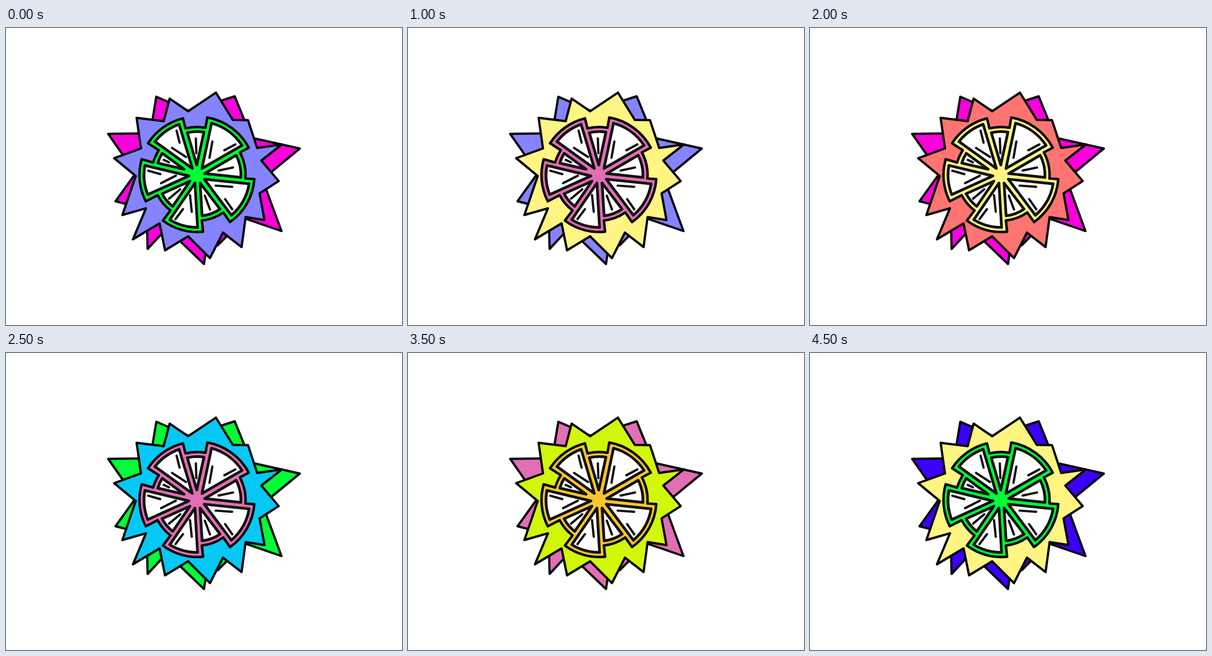
Write an HTML page with a canvas that moves like this. It is 864x648 px and loops after 5000 ms.

```html
<!DOCTYPE html>
<html lang="en">
<head>
<meta charset="utf-8">
<title>Citrus burst</title>
<style>
html, body { margin: 0; width: 100%; height: 100%; overflow: hidden; background: #fff; }
canvas { display: block; }
</style>
</head>
<body>
<canvas id="stage" width="864" height="648"></canvas>
<script>
const ctx = document.getElementById('stage').getContext('2d');
const STEP = 500;
const RAD = Math.PI / 180;
const FRUIT = [417, 321];
const HUB = [421.5, 318], HUB_R = 138.5;

const green = '#00ff37', peri = '#8584ff', magenta = '#fc00dc', cyan = '#05c8f5';
const lavender = '#c2ceff', coral = '#ff7470', pink = '#e26eb4', lime = '#d2f70a';
const orange = '#fac52d', yellow = '#fff582', indigo = '#3c00ff';

// fruit, inner burst, outer burst
const schemes = [
  [green, peri, magenta], [peri, lavender, cyan], [pink, yellow, peri],
  [lavender, coral, cyan], [yellow, coral, magenta], [pink, cyan, green],
  [coral, lavender, orange], [orange, lime, pink], [lavender, magenta, lime],
  [green, yellow, indigo]
];

// Spikes on a round hub: tip x, tip y, then the hub angle of the next notch.
const outerSpikes = [
  [328, 150, -99], [499, 149, -34.5], [641, 263, 5], [601, 443, 44.6], [462, 474, 82],
  [432, 515, 120.7], [309, 482, 146], [239, 378, 180.5], [223, 231, 219.6]
];
const innerSpikes = [
  [357, 154, -100], [458, 141, -58], [528, 201, -24], [602, 254, -12], [595, 334, 18],
  [564, 419, 43], [514, 478, 68], [445, 502, 100], [347, 485, 128.6], [277, 461, 147],
  [254, 408, 178], [236, 284, 203.5], [285, 196, 236]
];

// Cut angles around the fruit; wide and narrow slices alternate.
const cuts = [213, 256, 280, 332, 364, 415, 444, 487, 513, 556, 573];

function polar([cx, cy], deg, r) {
  return [cx + r * Math.cos(deg * RAD), cy + r * Math.sin(deg * RAD)];
}

function burst(spikes) {
  const path = new Path2D();
  for (const [x, y, notch] of spikes) {
    path.lineTo(x, y);
    path.lineTo(...polar(HUB, notch, HUB_R));
  }
  path.closePath();
  return path;
}

function addArc(path, r, from, to) {
  path.arc(...FRUIT, r, from * RAD, to * RAD);
}

function wedge(r, from, to, tip) {
  const path = new Path2D();
  addArc(path, r, from, to);
  path.lineTo(...polar(FRUIT, (from + to) / 2, tip));
  path.closePath();
  return path;
}

// A dash beside the ray at deg, shifted sideways by offset.
function dash(path, deg, from, to, offset) {
  const base = polar(FRUIT, deg + 90, offset);
  path.moveTo(...polar(base, deg, from));
  path.lineTo(...polar(base, deg, to));
}

const outerPath = burst(outerSpikes);
const innerPath = burst(innerSpikes);
const rimPath = new Path2D();
const dashPath = new Path2D();
const wedgePaths = [];

for (let i = 0; i < cuts.length - 1; i++) {
  const from = cuts[i], to = cuts[i + 1], mid = (from + to) / 2;
  if (i % 2 === 0) {
    const r = 126 - 2 * Math.sin(mid * RAD);
    addArc(rimPath, r, from, to);
    wedgePaths.push(wedge(r - 10, from + 5.5, to - 5.5, 18));
    dash(dashPath, from, 42, 78, 20);
    dash(dashPath, to, 78, 105, -20);
  } else {
    const r = 101.5 + 5 * Math.cos((mid + 45) * RAD);
    const spread = Math.sin((to - from) / 2 * RAD);
    addArc(rimPath, r, from, to);
    wedgePaths.push(wedge(r - 10, from + 1, to - 1, 4.6 / spread));
    dash(dashPath, mid, Math.max(48, 10 / spread), 80, 0);
  }
}
rimPath.closePath();

function paint(path, fill, line, width) {
  ctx.fillStyle = fill;
  ctx.strokeStyle = line;
  ctx.lineWidth = width;
  ctx.fill(path);
  ctx.stroke(path);
}

function draw(now) {
  const [fruit, inner, outer] = schemes[Math.floor(now / STEP) % schemes.length];
  ctx.fillStyle = '#fff';
  ctx.fillRect(0, 0, 864, 648);
  ctx.lineCap = ctx.lineJoin = 'round';
  paint(outerPath, outer, '#060a0a', 5);
  paint(innerPath, inner, '#050505', 5);
  paint(rimPath, fruit, '#0a0a0a', 5.5);
  wedgePaths.forEach(path => paint(path, '#fff', '#121212', 6));
  ctx.lineWidth = 5;
  ctx.stroke(dashPath);
}

const start = performance.now();
function tick() {
  draw(performance.now() - start);
  requestAnimationFrame(tick);
}
tick();
</script>
</body>
</html>
```
